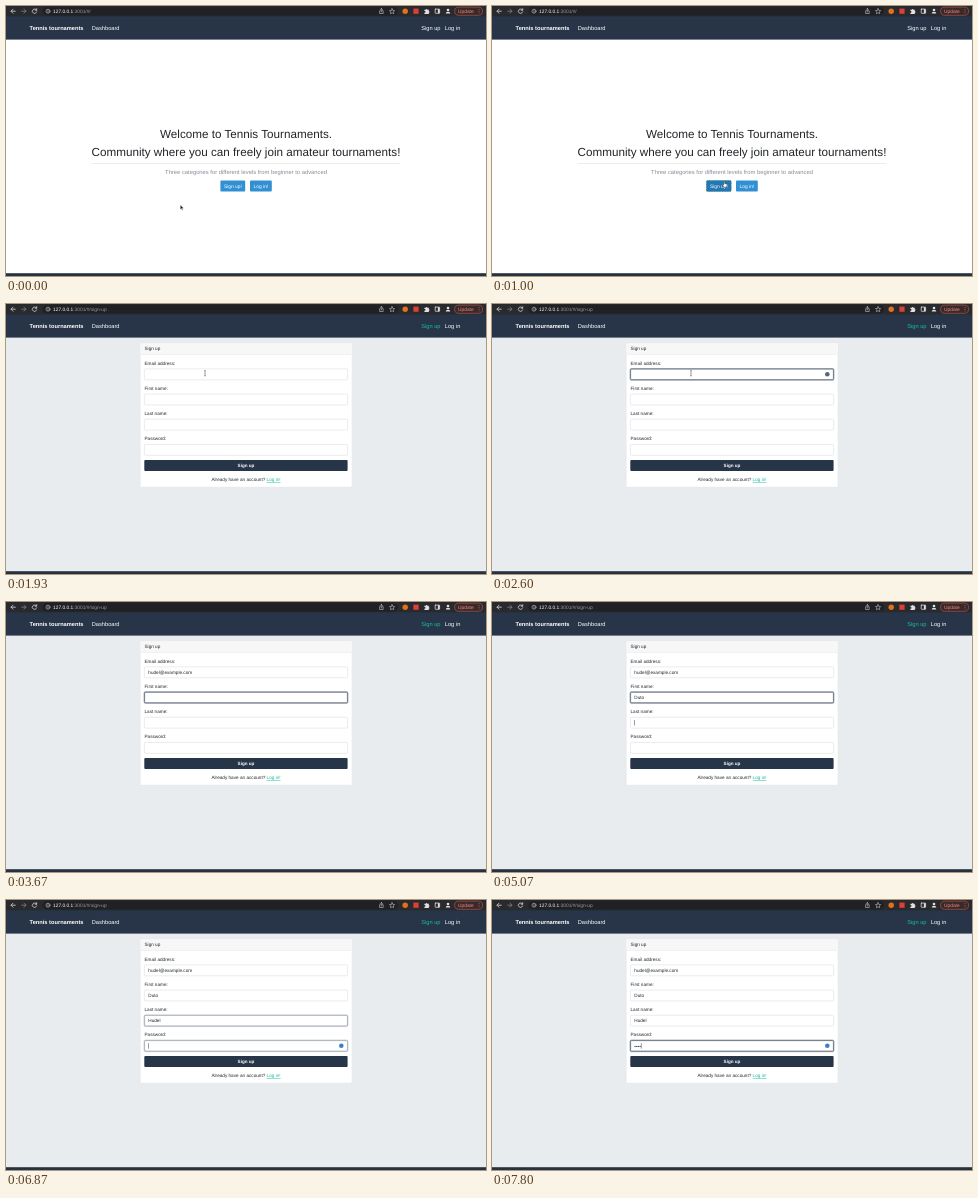
An HTML page for the animation above (8 s loop, 480 px wide and 270 px high).

```html
<!DOCTYPE html>
<html lang="en">
<head>
<meta charset="utf-8">
<title>Tennis tournaments</title>
<style>
  html, body { margin: 0; width: 100%; height: 100%; overflow: hidden; background: #fff; }
  svg { display: block; width: 480px; height: 270px; }
  text { font: 4.67px "Liberation Sans", Arial, sans-serif; fill: #212529; text-rendering: geometricPrecision; }
  .nav text { font-size: 5.7px; fill: #fff; }
  .url text { font-size: 4.85px; fill: #fff; }
  .url .dim { fill: #96999e; }
  .head { font-size: 11.68px; }
  .lead { font-size: 5.82px; fill: #868e96; }
  .btn { font-size: 4.9px; fill: #fff; }
  .mid { text-anchor: middle; }
  .bold, .nav .bold { font-weight: bold; }
  .link { fill: #18bc9c; text-decoration: underline; }
  .line { fill: none; stroke: #dfe1e5; stroke-width: .75; stroke-linecap: round; stroke-linejoin: round; }
  .glow { fill: none; stroke: #2c3e50; stroke-opacity: .28; stroke-width: 1.7; }
  .edge { fill: none; stroke: #465568; stroke-width: .6; }
</style>
</head>
<body>
<svg viewBox="0 0 480 270" xmlns="http://www.w3.org/2000/svg">
  <rect id="page" width="480" height="270" fill="#fff"/>

  <g id="home">
    <text class="head mid" x="240" y="131.5">Welcome to Tennis Tournaments.</text>
    <text class="head mid" x="240" y="150.2">Community where you can freely join amateur tournaments!</text>
    <rect x="85.5" y="157.5" width="309" height=".5" fill="#d9d9d9"/>
    <text class="lead mid" x="240" y="168.3">Three categories for different levels from beginner to advanced</text>
    <rect id="join" x="214.4" y="174.6" width="24.8" height="10.8" rx="1" fill="#3190d3"/>
    <text class="btn mid" x="226.9" y="181.7">Sign up!</text>
    <rect x="244" y="174.6" width="21.8" height="10.8" rx="1" fill="#3190d3"/>
    <text class="btn mid" x="254.9" y="181.7">Log in!</text>
  </g>

  <g id="signup">
    <rect x="134.3" y="39.2" width="211.6" height="143.9" rx="1.2" fill="#fff" stroke="#dcdfe2" stroke-width=".3"/>
    <path d="M134.4 50.3V40.4q0-1.1 1.1-1.1h209.2q1.1 0 1.1 1.1v9.9z" fill="#f7f7f7"/>
    <rect x="134.3" y="50.1" width="211.6" height=".4" fill="#dfdfdf"/>
    <text x="138.5" y="46.2">Sign up</text>
    <g id="rows"></g>
    <rect x="138.3" y="156" width="203.3" height="11.1" rx="1" fill="#273548"/>
    <text class="btn bold mid" x="240" y="163.2" style="font-size:4.6px">Sign up</text>
    <text class="mid" x="240" y="177.1">Already have an account? <tspan class="link">Log in!</tspan></text>
  </g>

  <rect y="267.2" width="480" height="2.8" fill="#273240"/>
  <g class="nav">
    <rect y="10" width="480" height="23.6" fill="#283548"/>
    <text class="bold" x="23.6" y="24.4">Tennis tournaments</text>
    <text x="85.7" y="24.4">Dashboard</text>
    <text id="tab" x="415.2" y="24.4">Sign up</text>
    <text x="438.8" y="24.4">Log in</text>
  </g>

  <g class="url">
    <rect width="480" height="10.4" fill="#292a2d"/>
    <rect x="36.5" y=".8" width="355.5" height="8.8" rx="4.4" fill="#202124"/>
    <text x="47" y="6.9">127.0.0.1<tspan id="path" class="dim"></tspan></text>
    <g class="line">
      <path d="M9.3 5.2H5.2M7 3.2L5 5.2l2 2"/>
      <path d="M15.7 5.2h4.1M18 3.2l2 2-2 2" stroke="#85888d"/>
      <path d="M30.4 3.9a2.2 2.2 0 1 0 .3 2M30.7 2.7v1.5h-1.5"/>
      <circle cx="42" cy="5.2" r="2" stroke-width=".5"/>
      <path d="M42 5v1.2M42 4v.1" stroke-width=".5"/>
      <path d="M374.4 4.7h-.8v2.8h3.6V4.7h-.8M375.4 6V2.5M374.4 3.4l1-1 1 1" stroke-width=".5"/>
      <path d="M386.1 2.7l.8 1.7 1.8.2-1.3 1.3.3 1.8-1.6-.9-1.6.9.3-1.8-1.3-1.3 1.8-.2z" stroke-width=".5"/>
      <rect x="429.2" y="3.1" width="4.4" height="4.2" rx=".4"/>
      <path d="M431.9 3.2h1.6v4h-1.6z" fill="#dfe1e5" stroke="none"/>
    </g>
    <circle cx="399.2" cy="5.2" r="2.7" fill="#e2711d"/>
    <rect x="407.4" y="2.6" width="5.2" height="5.2" fill="#dd4037"/>
    <g fill="#dfe1e5">
      <path d="M418.4 3.8h1.4a.8.8 0 1 1 1.6 0h1.4v1.4a.8.8 0 1 1 0 1.6v1.1h-4.4V6.600a.8.8 0 1 0 0-1.500z"/>
      <circle cx="442" cy="4" r="1.3"/>
      <path d="M439.7 7.6q0-1.900 2.300-1.900t2.300 1.900z"/>
    </g>
    <rect x="448.6" y="1.1" width="28" height="8.2" rx="4.1" fill="#3a2929" stroke="#d9675f" stroke-width=".5"/>
    <text x="452" y="6.9" style="fill:#f28b82">Update</text>
    <g fill="#f28b82"><circle cx="473" cy="3.500" r=".45"/><circle cx="473" cy="5.200" r=".45"/><circle cx="473" cy="6.900" r=".45"/></g>
  </g>

  <g id="pointer">
    <path id="arrow" d="M0 0v4.600l1.100-1 .7 1.700.8-.3-.7-1.700h1.500z" fill="#111" stroke="#fff" stroke-width=".35"/>
    <path id="hand" d="M-.5 0q.5-.7 1 0v2l2 .5q.5.2.4.9l-.4 2.200h-2.800l-1.700-2.300q.2-.7.9-.2l.6.500z" fill="#fff" stroke="#111" stroke-width=".4"/>
    <path id="beam" d="M-.8-2.700q.8 0 .8.600 0-.6.800-.6M0-2.100v4.200M-.8 2.700q.8 0 .8-.6 0 .6.800.6" fill="none" stroke="#333" stroke-width=".5"/>
  </g>
</svg>
<script>
const LOOP = 8000, RATE = 15;
const $ = id => document.getElementById(id);
const show = (el, on) => el.setAttribute('visibility', on ? 'inherit' : 'hidden');
const clamp = v => Math.max(0, Math.min(1, v));

// focus..blur: active span; off: caret blinks out; keys: tick of each keystroke
const fields = [
  { label: 'Email address:', text: 'hudel@example.com', focus: 31, blur: 47, off: 39, keys: [42], paste: true, icon: '#56677c' },
  { label: 'First name:', text: 'Duto', focus: 47, blur: 76, off: 55, keys: [62, 65, 67, 70] },
  { label: 'Last name:', text: 'Hudel', focus: 76, blur: 102, off: 84, keys: [87, 91, 94, 96, 98] },
  { label: 'Password:', text: '••••', focus: 102, blur: 130, off: 110, keys: [111, 113, 115, 117], icon: '#3d7fcb' }
];

fields.forEach((f, i) => {
  const y = 64.9 + i * 25.17;
  const box = 'x="138.400" width="203.200" height="10.900" rx="1.100"'.replace(/00"/g, '"');
  const g = document.createElementNS('http://www.w3.org/2000/svg', 'g');
  g.innerHTML = `<text x="138.5" y="${y - 4.4}">${f.label}</text>
    <rect ${box} y="${y}" fill="#fff" stroke="#cdd3d9" stroke-width=".45"/>
    <g class="ring"><rect class="glow" ${box} y="${y}"/><rect class="edge" ${box} y="${y}"/></g>
    <text class="value" x="142.3" y="${y + 7.1}"></text>
    <rect class="caret" y="${y + 2.8}" width=".45" height="5.4" fill="#222"/>
    <circle class="icon" cx="335.3" cy="${y + 5.4}" r="2.3" fill="${f.icon || 'none'}"/>`;
  $('rows').append(g);
  for (const part of ['ring', 'value', 'caret', 'icon']) f[part] = g.querySelector('.' + part);
  if (f.label === 'Password:') f.value.style.fontSize = '4.67px';
});

// [tick, x, y]
const track = [
  [1, 174.3, 199], [3, 215, 165], [5, 320, 88], [7, 422, 24], [8, 441, 22.5], [10, 385, 70],
  [12, 262, 152], [13, 234, 177], [14, 232.2, 175.5],
  [21, 232.2, 175.5], [23, 245, 142], [25, 212, 82], [26, 199, 69.3]
];

function at(n) {
  let i = track.findIndex(p => p[0] > n);
  if (i === 0) return track[0].slice(1);
  if (i < 0) return track[track.length - 1].slice(1);
  const a = track[i - 1], b = track[i], k = (n - a[0]) / (b[0] - a[0]);
  return [a[1] + (b[1] - a[1]) * k, a[2] + (b[2] - a[2]) * k];
}

function mix(k) {
  const green = [24, 188, 156];
  return `rgb(${green.map(c => Math.round(255 + (c - 255) * k))})`;
}

function drawField(f, n) {
  const typed = f.keys.filter(k => n >= k).length;
  f.value.textContent = f.paste && typed ? f.text : f.text.slice(0, typed);
  const active = n >= f.focus && n < f.blur;
  f.ring.setAttribute('opacity', clamp((n - f.focus) / 2) * (1 - clamp((n - f.blur) / 2)));
  show(f.caret, active && (n < f.off || n >= f.keys[0]));
  f.caret.setAttribute('x', 142.3 + (typed ? f.value.getComputedTextLength() + .1 : 0));
  show(f.icon, f.icon && active && n > f.focus);
}

function draw(ms) {
  const n = Math.floor(ms * RATE / 1000 + .1) % 120;
  const form = n >= 16;
  show($('home'), !form);
  show($('signup'), form);
  $('page').setAttribute('fill', form ? '#e9ecef' : '#fff');
  $('path').textContent = ':3001/#/' + (form ? 'sign-up' : '');

  const [x, y] = at(n);
  const over = !form && y < 28 && x > 411 && x < 437;
  $('tab').style.fill = mix(form ? clamp((n - 15.6) / 2.4) : over ? .6 : 0);

  const press = n >= 14;
  $('join').setAttribute('fill', press ? '#2278b3' : '#3190d3');
  $('join').setAttribute('stroke', press ? '#20506f' : 'none');
  $('join').setAttribute('stroke-width', .5);
  $('join').setAttribute('stroke-dasharray', '1 .6');

  $('pointer').setAttribute('transform', `translate(${x} ${y})`);
  show($('pointer'), n < 47);
  const hand = over || (press && !form);
  show($('arrow'), !form && !hand);
  show($('hand'), hand);
  show($('beam'), form);

  fields.forEach(f => drawField(f, n));
}

const start = performance.now();
function frame() {
  draw((performance.now() - start) % LOOP);
  requestAnimationFrame(frame);
}
frame();
</script>
</body>
</html>
```
